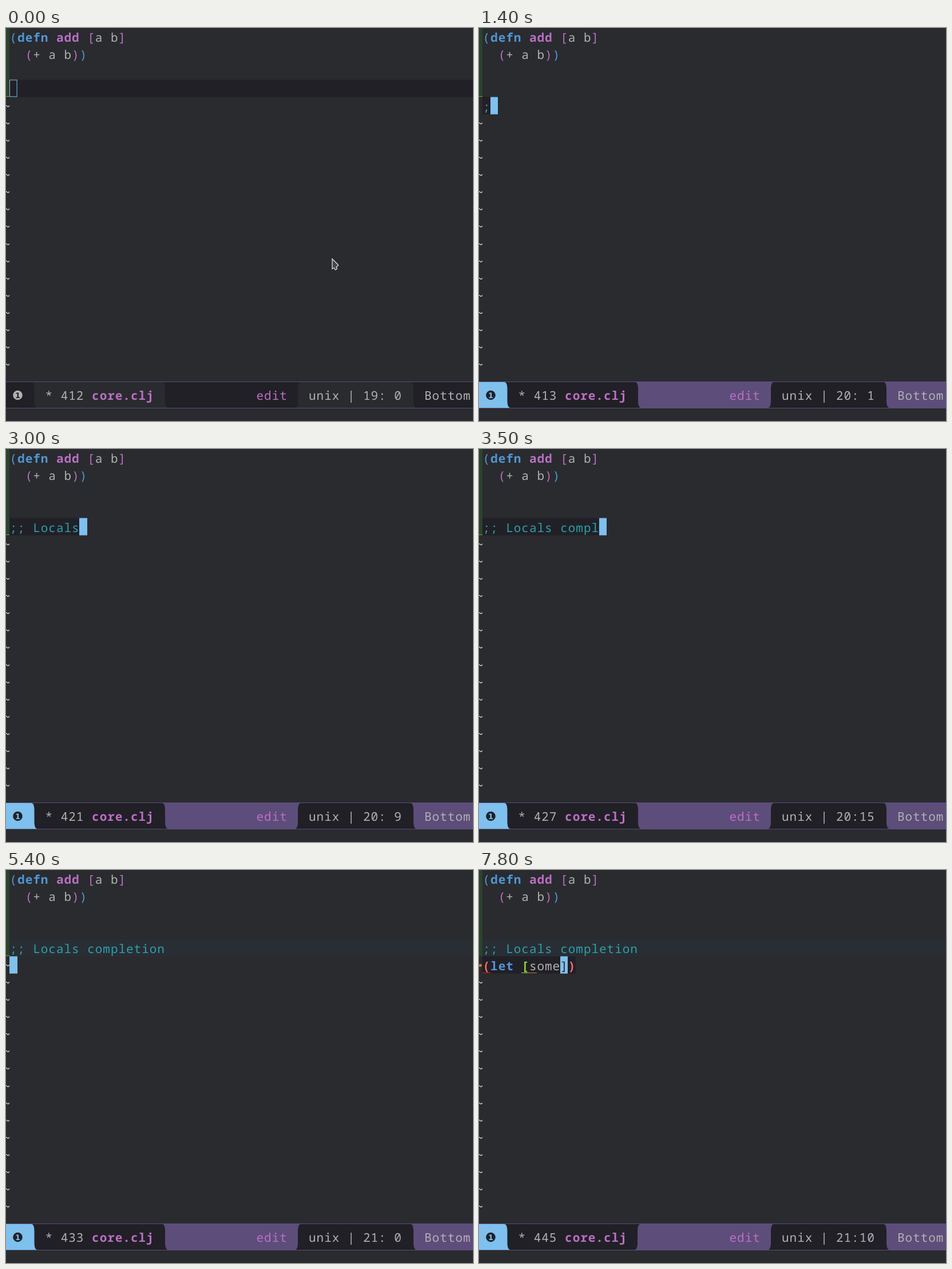
Animation of 816 by 686 pixels, one loop 8000 ms. Source, as an HTML page with a canvas:

```html
<!DOCTYPE html>
<html lang="en">
<head>
<meta charset="utf-8">
<title>Editor typing</title>
<style>
  html, body { margin: 0; width: 100%; height: 100%; overflow: hidden; background: #292b2e; }
  canvas { display: block; }
</style>
</head>
<body>
<canvas id="stage" width="816" height="686"></canvas>
<script>
const ctx = document.getElementById('stage').getContext('2d');
const W = 816, H = 686, LOOP = 8000;
const CELL = 13.57, ROW = 30.13, LEFT = 6, BAR_TOP = 617, BAR_END = 663;
const C = {
  bg: '#292b2e', dark: '#212026', text: '#b2b2b2', blue: '#4f97d7', pink: '#bc6ec5',
  comment: '#2aa1ae', commentBg: '#292e34', cursor: '#7ec0ee', purple: '#5d4d7a',
  match: '#86dc2f', red: '#ff6a6a', error: '#e0211d', warn: '#dc752f',
  added: '#2a432d', addedEdge: '#67b11d'
};

const FONT = '21px "Noto Sans Mono", monospace';
ctx.textRendering = 'geometricPrecision';
ctx.font = FONT;
const SPACING = CELL - ctx.measureText('a').width;

const COMMENT = ';; Locals completion';
const FORM = '(let [some';
// [time, number of keys typed since the first new line]
const KEYS = [
  [300, 0], [1400, 1], [1500, 2], [1800, 3], [2300, 4], [2700, 6], [2800, 8], [3000, 9],
  [3200, 11], [3300, 13], [3500, 15], [3600, 17], [3800, 18], [3900, 19], [4100, 20],
  [4700, 21], [5500, 22], [5700, 23], [5800, 24], [6100, 25], [6400, 26], [6500, 27],
  [7000, 28], [7600, 30], [7800, 31]
];

const colX = col => LEFT + col * CELL;
const rowY = row => row * ROW;
const within = (t, from, to) => t >= from && t < to;

function rect(x, y, w, h, color) {
  ctx.fillStyle = color;
  ctx.fillRect(x, y, w, h);
}

function text(str, x, y, color, bold) {
  ctx.font = bold ? 'bold ' + FONT : FONT;
  ctx.letterSpacing = SPACING + 'px';
  ctx.fillStyle = color;
  ctx.fillText(str, x + SPACING / 2, y);
}

function code(str, col, row, color, bold) {
  text(str, colX(col), rowY(row) + 24, color, bold);
}

function fillCells(row, from, to, color) {
  const x = Math.round(colX(from));
  rect(x, rowY(row), Math.round(colX(to)) - x, ROW, color);
}

function underline(col, row, color) {
  const x = Math.round(colX(col));
  rect(x, Math.floor(rowY(row + 1)) - 1, Math.round(colX(col + 1)) - x, 1, color);
}

function drawTilde(row) {
  const y = Math.round(rowY(row) + 14);
  for (const [x, dy, w] of [[0, 0, 2], [5, 0, 1], [1, 1, 2], [4, 1, 2], [2, 2, 3]])
    rect(x, y + dy, w, 1, '#c8c8c8');
}

function drawFunction() {
  code('(', 0, 0, C.blue);
  code('defn', 1, 0, C.blue, true);
  code('add', 6, 0, C.pink, true);
  code('[', 10, 0, C.pink);
  code('a b', 11, 0, C.text);
  code(']', 14, 0, C.pink);
  code('(', 2, 1, C.pink);
  code('+ a b', 3, 1, C.text);
  code(')', 8, 1, C.pink);
  code(')', 9, 1, C.blue);
}

function drawForm(t, col, closers) {
  const checked = t >= 7600, nested = t >= 6900, matched = t >= 5700;
  const outer = nested ? C.red : matched ? C.match : C.blue;
  const end = col + closers.length - 1;
  fillCells(5, 0, end + 1, C.dark);
  code('(', 0, 5, outer, matched);
  code(FORM.slice(1, Math.min(col, 4)), 1, 5, col >= 4 ? C.blue : C.text, col >= 4);
  if (col >= 6) {
    code('[', 5, 5, nested ? C.match : C.pink, nested);
    code(FORM.slice(6, col), 6, 5, C.text);
  }
  code(')', end, 5, outer, matched);
  if (nested) underline(5, 5, C.match);
  else if (matched) {
    underline(0, 5, C.match);
    underline(end, 5, C.match);
  }
  if (checked) {
    underline(0, 5, C.error);
    underline(6, 5, C.warn);
  }
}

function drawFringe(t, lastRow) {
  for (let row = lastRow; row <= 20; row++) drawTilde(row);
  const rows = t < 2100 ? 4 : within(t, 6900, 7600) ? 6 : 5;
  rect(0, 0, LEFT, rowY(rows), C.added);
  if (t < 7600) rect(0, Math.floor(rowY(rows)) - 1, LEFT, 1, C.addedEdge);
  else {
    ctx.fillStyle = C.warn;
    ctx.beginPath();
    ctx.arc(2.5, 166.5, 2.5, 0, 7);
    ctx.fill();
  }
}

// Fills the bar from a wavy edge to the right end; lean 1 or -1 sets its slant.
function barFrom(x, lean, color) {
  const top = BAR_TOP + 1, d = 5.5 * lean;
  ctx.fillStyle = color;
  ctx.beginPath();
  ctx.moveTo(x - d, top);
  ctx.quadraticCurveTo(x, top, x, top + 13);
  ctx.lineTo(x, BAR_END - 13);
  ctx.quadraticCurveTo(x, BAR_END, x + d, BAR_END);
  ctx.lineTo(W, BAR_END);
  ctx.lineTo(W, top);
  ctx.fill();
}

function drawBar(t, active, size, line, col) {
  const outer = active ? C.purple : C.dark, inner = active ? C.dark : C.bg;
  const flipped = within(t, 2300, 2700) || within(t, 4700, 5400) || t >= 7400;
  rect(0, BAR_TOP, W, H - BAR_TOP, C.bg);
  rect(0, BAR_TOP, W, BAR_END - BAR_TOP, active ? C.cursor : C.dark);
  barFrom(49.5, 1, inner);
  barFrom(flipped ? 277 : 278, flipped ? -1 : 1, outer);
  barFrom(510, -1, inner);
  barFrom(712, 1, outer);
  rect(0, BAR_TOP, W, 1, C.purple);
  rect(0, BAR_END, W, 1, C.purple);

  ctx.fillStyle = active ? C.dark : C.text;
  ctx.beginPath();
  ctx.arc(20.5, 641, 8.3, 0, 7);
  ctx.fill();
  ctx.font = 'bold 13px "DejaVu Sans", sans-serif';
  ctx.letterSpacing = '0px';
  ctx.fillStyle = active ? C.cursor : C.dark;
  ctx.fillText('1', 16, 645.8);

  text('* ' + size, 68, 649, C.text);
  text('core.clj', 149.6, 649, C.pink, true);
  text('edit', 437, 649, C.pink);
  text(`unix | ${line}:${String(col).padStart(2)}`, 528.5, 649, C.text);
  text('Bottom', 730.5, 649, C.text);
}

function drawPointer() {
  ctx.beginPath();
  ctx.moveTo(570, 403);
  for (const [x, y] of [[580.5, 413.5], [580, 415.5], [577, 416.5], [578.5, 420.5], [575.5, 422.3], [573, 418.5], [570, 420.5]])
    ctx.lineTo(x, y);
  ctx.closePath();
  ctx.fillStyle = '#45464a';
  ctx.fill();
  ctx.lineWidth = 1.2;
  ctx.strokeStyle = '#e8e8e8';
  ctx.stroke();
}

function draw(t) {
  const active = t >= 200, started = t >= 300;
  const keys = KEYS.reduce((n, [time, count]) => t >= time ? count : n, 0);
  const onForm = keys > COMMENT.length;
  const col = onForm ? keys - COMMENT.length - 1 : keys;
  const row = !started ? 3 : onForm ? 5 : 4;
  const closers = !onForm || !col ? '' : col >= 6 ? '])' : ')';

  rect(0, 0, W, H, C.bg);
  drawFunction();
  if (!started) rect(LEFT, rowY(3), W, ROW, C.dark);
  else {
    if (onForm) rect(LEFT, rowY(4), W, ROW, C.commentBg);
    else fillCells(4, 0, col, C.dark);
    code(COMMENT.slice(0, keys), 0, 4, C.comment);
  }
  if (closers) drawForm(t, col, closers);
  drawFringe(t, started && !col ? row : row + 1);

  if (active) {
    fillCells(row, col, col + 1, C.cursor);
    if (closers) code(closers[0], col, row, C.bg);
  } else {
    ctx.lineWidth = 1;
    ctx.strokeStyle = C.cursor;
    ctx.strokeRect(6.5, 90.8, 12.6, 29);
  }
  drawBar(t, active, 412 + keys + closers.length, 16 + row, col);
  if (t < 500) drawPointer();
}

function frame() {
  draw(performance.now() % LOOP);
  requestAnimationFrame(frame);
}
frame();
</script>
</body>
</html>
```
